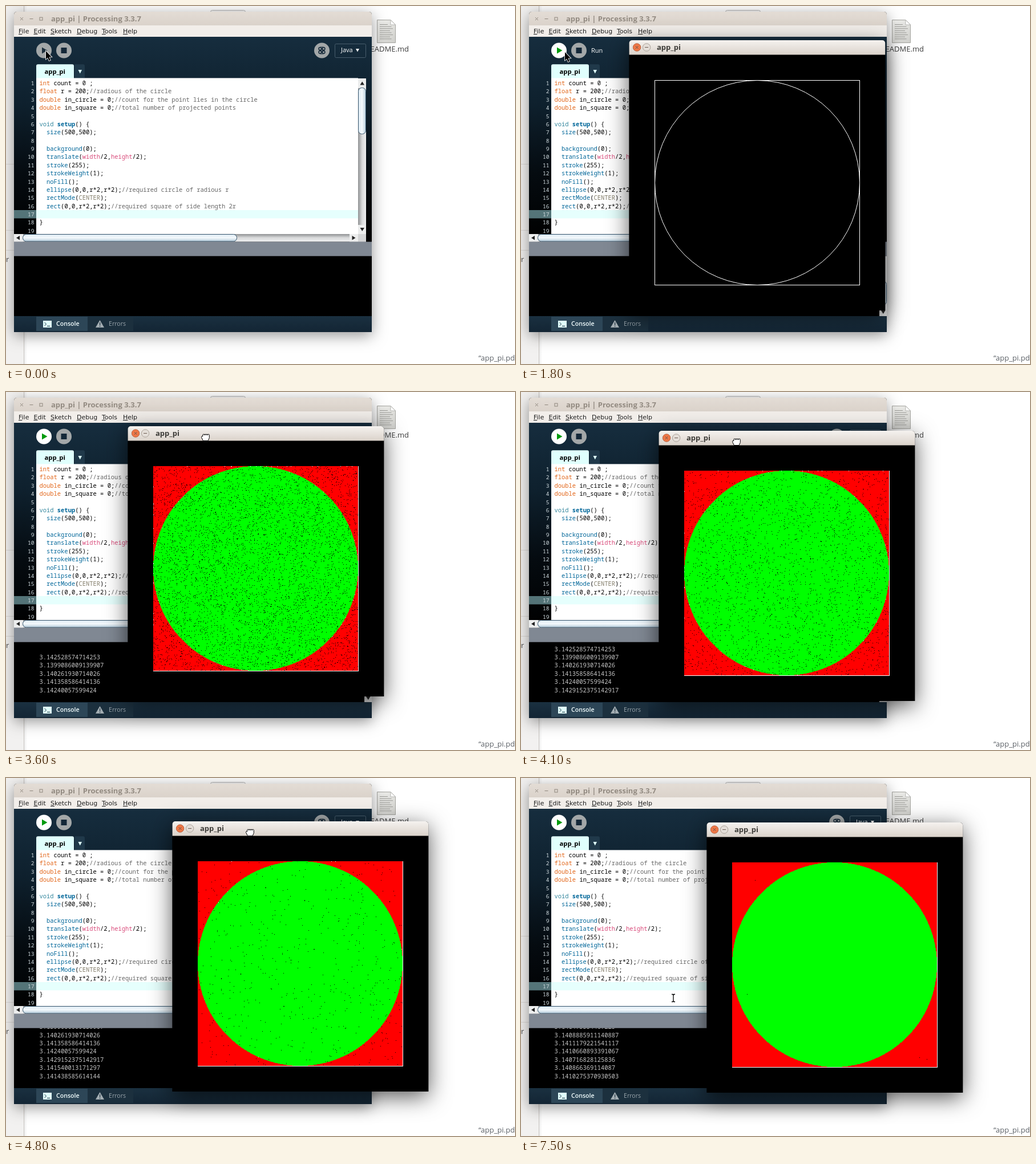
Recreate the animation shown at these times as an HTML page with a canvas. Size 892 by 628 pixels, loop 8000 ms.

```html
<!DOCTYPE html>
<html lang="en">
<head>
<meta charset="utf-8">
<title>Monte Carlo pi</title>
<style>
html, body { margin: 0; height: 100%; overflow: hidden; background: #fff; }
canvas { display: block; }
</style>
</head>
<body>
<canvas id="stage" width="892" height="628"></canvas>
<script>
const ctx = document.getElementById('stage').getContext('2d');
const LOOP = 8000, TICK = 100, ROW = 14.38, SIDE = 359;
const MONO = '10.45px "Noto Sans Mono", "DejaVu Sans Mono", monospace';
const SANS = '"Open Sans", "Noto Sans", sans-serif';

const CODE = `int count = 0 ;
float r = 200;//radious of the circle
double in_circle = 0;//count for the point lies in the circle
double in_square = 0;//total number of projected points

void setup() {
  size(500,500);

  background(0);
  translate(width/2,height/2);
  stroke(255);
  strokeWeight(1);
  noFill();
  ellipse(0,0,r*2,r*2);//required circle of radious r
  rectMode(CENTER);
  rect(0,0,r*2,r*2);//required square of side length 2r

}
`.split('\n');

// Each rule colours the token it matches.
const RULES = [
  [/^\/\/.*/, '#666'], [/^(int|float|double)\b/, '#e2661a'], [/^void\b/, '#33879e'],
  [/^setup\b/, '#006699', 'bold '], [/^(width|height)\b/, '#d94a7a'],
  [/^CENTER/, '#857f6c'], [/^\w+(?=\()/, '#006699'], [/^(\w+|\s+|.)/, '#000']
];

const ESTIMATES = ['3.142528574714253', '3.1399086009139907', '3.140261930714026',
  '3.141358586414136', '3.14240057599424', '3.1429152375142917', '3.141540013171297',
  '3.141438585614144', '3.141053033914105', '3.1415125848741514', '3.141475354467225',
  '3.1408885911140887', '3.1411179221541117', '3.1410660893391067', '3.140716828125836',
  '3.140866369114087', '3.1410275370930503'];

// time, printed lines, -ln(share of pixels not yet hit)
const DRAWS = [[0, 0, 0], [3100, 3, 1.65], [3400, 4, 2.4], [3600, 5, 3.2], [3800, 5, 3.5],
  [4000, 6, 3.9], [4300, 7, 4.6], [4700, 8, 5.4], [5000, 9, 6.2], [5700, 10, 7.6],
  [5900, 11, 8.2], [6200, 11, 8.8], [6800, 14, 9.8], [7500, 17, 10.8]];

// time, x, y
const WINDOW_PATH = [[0, 190, 60], [3200, 190, 60], [3600, 214, 60], [3900, 214, 60],
  [4300, 269, 75], [4600, 269, 75], [5100, 326, 78]];
const POINTER_PATH = [[0, 70, 79], [1600, 70, 79], [1700, 77, 81], [1800, 77, 81],
  [2200, 219, 131], [2300, 219, 131], [2400, 220, 132], [3000, 220, 132], [3100, 322, 77],
  [5600, 322, 77], [5700, 461, 98], [6700, 461, 98], [6800, 267, 386]];

function along(path, t) {
  const i = path.findIndex(p => p[0] > t);
  if (i < 0) return path[path.length - 1].slice(1);
  const [t0, x0, y0] = path[i - 1], [t1, x1, y1] = path[i];
  const k = (t - t0) / (t1 - t0);
  return [Math.round(x0 + (x1 - x0) * k), Math.round(y0 + (y1 - y0) * k)];
}

function box(x, y, w, h, fill) {
  ctx.fillStyle = fill;
  ctx.fillRect(x, y, w, h);
}

function round(x, y, w, h, r, fill, stroke) {
  ctx.beginPath();
  ctx.roundRect(x, y, w, h, r);
  paint(fill, stroke);
}

function disc(x, y, r, fill, stroke) {
  ctx.beginPath();
  ctx.arc(x, y, r, 0, 7);
  paint(fill, stroke);
}

function poly(points, fill, stroke, open) {
  ctx.beginPath();
  for (let i = 0; i < points.length; i += 2) ctx.lineTo(points[i], points[i + 1]);
  if (!open) ctx.closePath();
  paint(fill, stroke);
}

function paint(fill, stroke) {
  if (fill) { ctx.fillStyle = fill; ctx.fill(); }
  if (stroke) { ctx.strokeStyle = stroke; ctx.stroke(); }
}

function text(s, x, y, font, fill, align = 'left') {
  ctx.font = font;
  ctx.fillStyle = fill;
  ctx.textAlign = align;
  ctx.fillText(s, x, y);
}

function blend(x0, y0, x1, y1, ...colors) {
  const g = ctx.createLinearGradient(x0, y0, x1, y1);
  colors.forEach((c, i) => g.addColorStop(i / (colors.length - 1), c));
  return g;
}

function clipped(x, y, w, h, draw) {
  ctx.save();
  ctx.beginPath();
  ctx.rect(x, y, w, h);
  ctx.clip();
  draw();
  ctx.restore();
}

function shadowed(x, y, w, h, strong) {
  ctx.save();
  ctx.shadowColor = strong ? 'rgba(0,0,0,.65)' : 'rgba(0,0,0,.42)';
  ctx.shadowBlur = strong ? 38 : 26;
  ctx.shadowOffsetY = strong ? 9 : 6;
  round(x, y, w, h, [5, 5, 0, 0], '#000');
  ctx.restore();
}

function titleBar(x, y, w, title, titleX, focused, buttons) {
  const [top, low, ink] = focused ? ['#f5f2ef', '#dbd3cb', '#3c3b37'] : ['#e3dcd5', '#dad2ca', '#938b82'];
  round(x, y, w, 25.4, [5, 5, 0, 0], blend(0, y, 0, y + 25, top, low));
  for (let i = 0; i < buttons; i++) {
    const cx = x + 13.5 + i * 17, cy = y + 12.5;
    const mark = focused ? '#6b5a50' : '#8e867d';
    if (focused) disc(cx, cy, 6.7, i ? '#e4ded8' : '#f07746', i ? '#aaa198' : '#b5613f');
    if (i === 0) {
      poly([cx - 2.5, cy - 2.5, cx + 2.5, cy + 2.5], null, mark, true);
      poly([cx + 2.5, cy - 2.5, cx - 2.5, cy + 2.5], null, mark, true);
    } else if (i === 1) box(cx - 3, cy - .5, 6, 1, mark);
    else ctx.strokeRect(cx - 2.5, cy - 2.5, 5, 5);
  }
  text(title, titleX, y + 17, `bold 13px ${SANS}`, ink);
}

function desktop() {
  box(0, 0, 892, 628, '#fff');
  box(0, 0, 31, 628, '#f2f1f0');
  box(31, 0, 1, 628, '#c9c5c1');
  box(32, 0, 5, 628, blend(32, 0, 37, 0, '#ededed', '#fff'));
  for (const y of [277, 393, 428]) box(0, y, 31, 1, '#dcd9d6');
  text('r', 0, 449, `13px ${SANS}`, '#4c4c4c');
  round(358.5, 7.5, 61, 20, 3, '#f4f4f4', '#b5b5b5');
  poly([650.5, 24.5, 674, 24.5, 682.5, 33, 682.5, 64.5, 650.5, 64.5],
    blend(650, 24, 683, 65, '#f1f1ee', '#cfcfcb'), '#a5a5a0');
  poly([674, 24.5, 674, 33, 682.5, 33], '#fff', '#b4b4b0');
  for (let i = 0; i < 8; i++) box(655, 32 + i * 3.6, i < 1 ? 14 : 18 + i % 3 * 2.5, 1, '#9b9b97');
  text('README.md', 706, 80, `13px ${SANS}`, '#3c3c3c', 'right');
  text('“app_pi.pd', 828, 622, `13px ${SANS}`, '#5b6066');
}

function toolbar(t) {
  const running = t >= 700;
  disc(66.5, 78, 13.5, running ? '#fff' : '#a3a7a8');
  poly([63, 72.5, 63, 83.5, 72.5, 78], running ? '#009a0c' : '#1d2f3c');
  disc(101.5, 78, 13.5, '#a3a7a8');
  box(96.5, 73, 10, 10, '#142838');
  if (t >= 200 && t < 1900) text('Run', 123, 82, `11px ${SANS}`, '#fff');
  disc(553.5, 78, 13.5, '#a3a7a8');
  ctx.lineWidth = 1.5;
  for (const s of [-1, 1]) {
    disc(553.5 + s * 3, 75, 2.4, null, '#142838');
    disc(553.5 + s * 3, 81, 2.4, null, '#142838');
    box(553 + s * 1.2, 71, 1.2, 14, '#142838');
  }
  ctx.lineWidth = 1;
  round(576.5, 66.5, 54, 24, 2, null, '#485d6c');
  text('Java', 587, 81, `11px ${SANS}`, '#fff');
  poly([613, 75, 619, 75, 616, 80.5], '#fff');

  round(53, 102.3, 66, 24.7, [3, 3, 0, 0], '#e0fffd');
  text('app_pi', 67.5, 118.5, `bold 11.3px ${SANS}`, '#000');
  round(120.5, 102.3, 17.5, 24.2, [0, 3, 0, 0], '#20394a');
  poly([126.5, 112, 133, 112, 129.75, 118.5], '#e0fffd');
}

function codeLine(line, x, y) {
  while (line) {
    const [pattern, color, weight = ''] = RULES.find(r => r[0].test(line));
    const token = line.match(pattern)[0];
    text(token, x, y, weight + MONO, color);
    x += token.length * 6.27;
    line = line.slice(token.length);
  }
}

function editor(t) {
  box(53, 126.4, 564, 273.6, '#fff');
  box(14, 358, 39, 14.5, '#547478');
  box(53, 358, 564, 14.5, '#e6fffd');
  clipped(14, 127, 603, 273, () => CODE.forEach((line, i) => {
    const y = 139 + i * ROW;
    text(i + 1, 49.5, y, MONO.replace('10.45', '9.6'), '#d3dde1', 'right');
    codeLine(line, 58.5, y);
  }));
  if (t >= 700 && t < 1200) box(58, 358, 1, 14, '#000');

  const track = ['#8f9193', '#d8d9da', '#eeeff0'], thumb = ['#d9e8f2', '#f4f9fc', '#b4cbda'];
  box(617, 127, 14, 273, blend(617, 0, 631, 0, ...track));
  box(617, 127, 14, 17, '#eceded');
  box(617, 384, 14, 16, '#eceded');
  round(617.5, 143.5, 13, 81, 6, blend(617, 0, 631, 0, ...thumb), '#35536a');
  poly([620.5, 138.5, 628, 138.5, 624.25, 132.5], '#222');
  poly([620.5, 389, 628, 389, 624.25, 395], '#222');
  box(14, 400, 617, 13.6, blend(0, 400, 0, 413, ...track));
  box(14, 400, 16, 13.6, '#eceded');
  box(602, 400, 15, 13.6, '#eceded');
  box(617, 400, 14, 13.6, '#d4d5d6');
  round(29.5, 400.5, 375, 12.4, 6, blend(0, 400, 0, 413, ...thumb), '#35536a');
  poly([24, 403, 24, 410.5, 18, 406.75], '#222');
  poly([606.5, 403, 606.5, 410.5, 612.5, 406.75], '#222');
}

function consolePane(t, count) {
  box(14, 438, 627, 106, '#000');
  box(14, 413.6, 627, 25.1, '#808893');
  clipped(14, 438.7, 614, 105.3, () => {
    for (let i = 0; i < count; i++) {
      text(ESTIMATES[i], 58.5, 526.5 - (count - 1 - i) * ROW, MONO, '#c6c6c6');
    }
  });
  if (t >= 1700) {
    box(628, 438.7, 13, 105.3, blend(628, 0, 641, 0, '#8f9193', '#eeeff0'));
    round(628.5, 482.5, 12, 42, 6, '#dce8f0', '#35536a');
    box(628, 531, 13, 13, '#dddede');
    poly([631, 534, 638.5, 534, 634.75, 540], '#222');
  }
  box(14, 544, 627, 28, blend(0, 544, 0, 572, '#1a3040', '#132534'));
  box(53, 545, 90, 25, '#2d4657');
  box(143, 545, 80, 25, '#1c303e');
  box(65, 552, 15, 12, '#e0fffd');
  poly([67.5, 555, 70.5, 558, 67.5, 561], null, '#142838', true);
  box(72, 561, 5, 1, '#142838');
  text('Console', 88, 561, `600 10.6px ${SANS}`, '#f4ffff');
  poly([164.5, 551, 172, 564, 157, 564], '#a3adb2');
  box(164, 555, 1.2, 5, '#1c303e');
  box(164, 561, 1.2, 1.5, '#1c303e');
  text('Errors', 180, 561, `10.6px ${SANS}`, '#9aa5ac');
}

function ideWindow(t, count) {
  const focused = t >= 700 && t < 1700;
  shadowed(14, 10, 627, 562, focused);
  titleBar(14, 10, 627, 'app_pi | Processing 3.3.7', 79, focused, 3);
  box(14, 34, 627, 20, '#f2eeea');
  const menu = { File: 22, Edit: 48.5, Sketch: 78, Debug: 124, Tools: 168, Help: 205 };
  for (const name in menu) {
    text(name, menu[name], 48, '11px "DejaVu Sans", sans-serif', '#1e1e1e');
    box(menu[name], 49, ctx.measureText(name[0]).width, 1, '#1e1e1e');
  }
  box(14, 54, 627, 360, blend(0, 54, 0, 413, '#162d3e', '#0e202d', '#050b10', '#000'));
  toolbar(t);
  editor(t);
  consolePane(t, count);
}

// A pixel is hit once the share of missed pixels falls below its random threshold.
const plot = document.createElement('canvas');
plot.width = plot.height = SIDE;
const plotCtx = plot.getContext('2d');
let seed = 7;
const thresholds = Float64Array.from({ length: SIDE * SIDE }, () =>
  (seed = (Math.imul(seed, 1664525) + 1013904223) >>> 0) / 2 ** 32);

function plotPoints(depth) {
  const image = plotCtx.createImageData(SIDE, SIDE), missed = Math.exp(-depth), c = SIDE / 2;
  thresholds.forEach((u, i) => {
    if (u < missed) return;
    const dx = i % SIDE + .5 - c, dy = Math.floor(i / SIDE) + .5 - c;
    image.data[i * 4 + (dx * dx + dy * dy < c * c ? 1 : 0)] = 255;
    image.data[i * 4 + 3] = 255;
  });
  plotCtx.putImageData(image, 0, 0);
}

function sketchWindow(t, depth) {
  const [x, y] = along(WINDOW_PATH, t);
  const left = x - .4, width = 448.6;
  ctx.globalAlpha = t < 1800 ? .6 : 1;
  shadowed(left, y, width, 474, true);
  box(left, y + 25, width, 449, '#000');
  titleBar(left, y, width, 'app_pi', x + 48, true, 2);
  if (t >= 1800) {
    ctx.strokeStyle = '#fff';
    ctx.strokeRect(x + 44.5, y + 70.5, SIDE, SIDE);
    disc(x + 224, y + 250, 179.5, null, '#fff');
    if (depth) {
      plotPoints(depth);
      ctx.drawImage(plot, x + 44, y + 70);
    }
  }
  ctx.globalAlpha = 1;
}

function pointer(t) {
  const grabbing = t >= 3300 && t < 5700;
  const [x, y] = along(grabbing ? WINDOW_PATH : POINTER_PATH, t);
  ctx.save();
  ctx.translate(x, y);
  if (grabbing) {
    ctx.translate(135.5, 19.5);
    ctx.beginPath();
    ctx.moveTo(-4, 6);
    ctx.lineTo(-7, 0);
    ctx.quadraticCurveTo(-7, -3, -4.5, -2);
    for (let i = 0; i < 4; i++) ctx.arc(-3.2 + i * 2.8, -3.8, 1.6, Math.PI, 0);
    ctx.lineTo(6.8, 1);
    ctx.lineTo(4.5, 6);
    ctx.closePath();
    paint('#fff', '#000');
  } else if (t >= 6800) {
    const beam = [-3, -6.5, -1, -6.5, 0, -5.5, 1, -6.5, 3, -6.5];
    for (const [width, color] of [[3, '#fff'], [1.3, '#000']]) {
      ctx.lineWidth = width;
      poly(beam, null, color, true);
      poly(beam.map((v, i) => i % 2 ? -v : v), null, color, true);
      poly([0, -5.5, 0, 5.5], null, color, true);
    }
  } else {
    const arrow = [0, 0, 0, 14.3, 3.2, 11.4, 5.5, 17, 7.8, 16, 5.5, 10.6, 10, 10.4];
    ctx.lineWidth = 1.6;
    poly(arrow, null, '#fff');
    poly(arrow, '#000');
  }
  ctx.restore();
}

let shown = -1;
function frame(now) {
  const t = Math.floor(now % LOOP / TICK) * TICK;
  if (t !== shown) {
    shown = t;
    const [, count, depth] = DRAWS.filter(d => d[0] <= t).pop();
    ctx.lineWidth = 1;
    desktop();
    ideWindow(t, count);
    if (t >= 1700) sketchWindow(t, depth);
    pointer(t);
  }
  requestAnimationFrame(frame);
}
requestAnimationFrame(frame);
</script>
</body>
</html>
```
